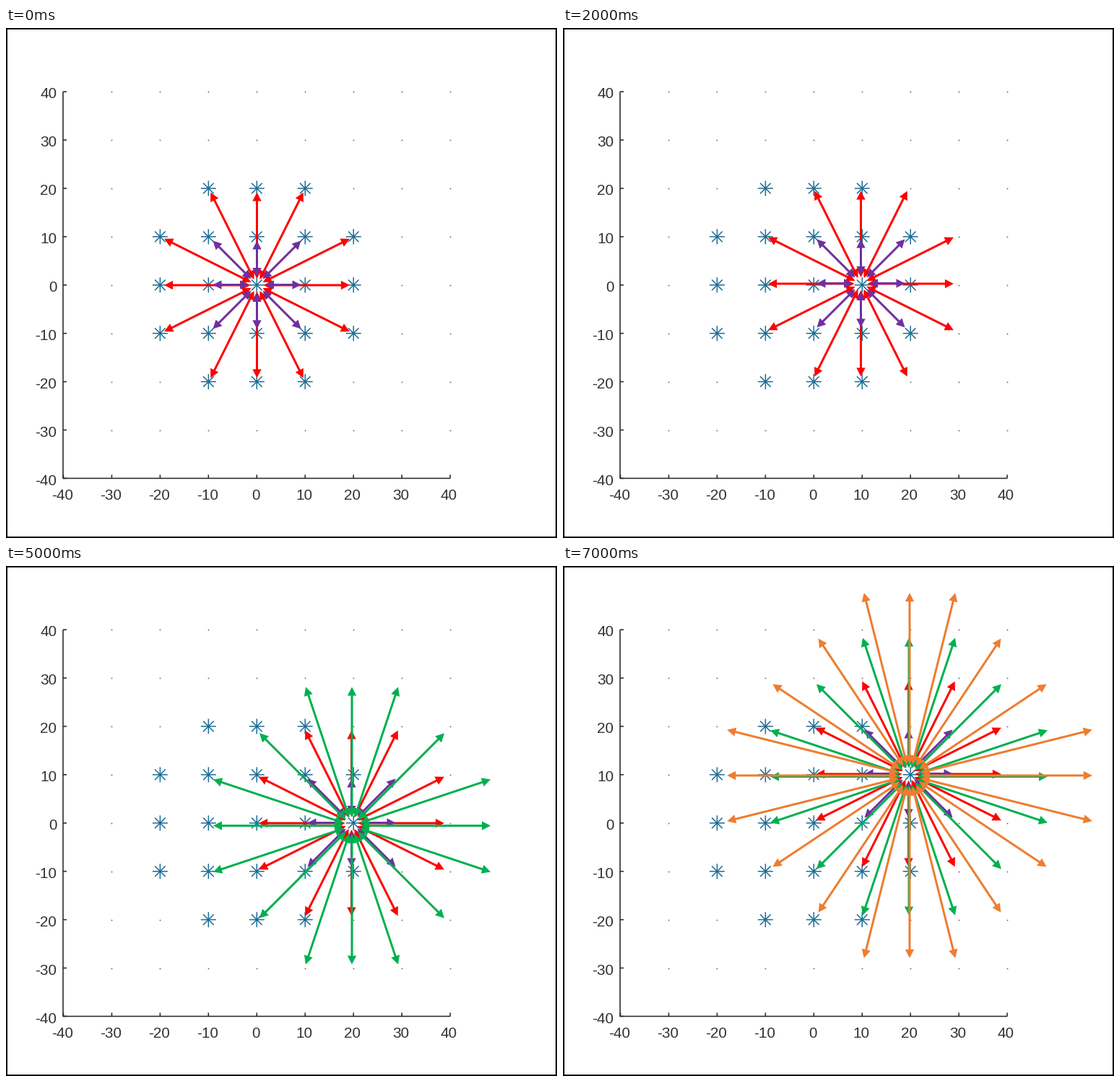
A matplotlib script that plays this animation: 763 px wide and 706 px high, repeating every 8 s.

```python
import itertools

import matplotlib.pyplot as plt
import numpy as np
from matplotlib.animation import FuncAnimation
from matplotlib.patches import Rectangle

W, H, DPI = 763, 706, 100
PX = 72 / DPI  # points per pixel
INK = "#2b2b2b"
STAR = "#1a6b94"

# Ring distance, colour, pixels per grid step, inner gap, centre shift.
# Drawn bottom to top in this order.
RINGS = [
    (2, "#ff0000", 64.2, 9, (0, 0.5)),
    (1, "#7030a0", 61.0, 11.5, (0, 0)),
    (3, "#00b050", 64.0, 12, (0.5, 4)),
    (4, "#ed7d31", 63.2, 16, (1.5, 2.5)),
]

# Hub position and number of visible rings for every second.
HUBS = [(347, 355), (412, 353), (478, 355), (478, 287)]
SCENES = [(0, 2), (1, 2), (1, 2), (1, 3), (2, 3), (2, 3), (2, 4), (3, 4)]


def px(value):
    return 346.8 + value * 6.695


def py(value):
    return 355.3 - value * 6.69


def ring_nodes(distance):
    """Grid steps that lie on a rounded ring around the hub."""
    steps = range(-distance, distance + 1)
    for x, y in itertools.product(steps, steps):
        near, far = sorted((abs(x), abs(y)))
        if far + near * 2 // 3 == distance:
            yield np.array([x, y], float)


def arrow(node, pitch, gap, shift):
    """Shaft and two triangular heads relative to the hub."""
    along = node / np.hypot(*node)
    side = np.array([-along[1], along[0]]) * 6.2
    outer, inner = node * pitch + shift, along * gap + shift
    away = (outer - inner) / np.hypot(*(outer - inner))
    shaft = np.array([outer - away * 9, inner + away * 9])
    heads = []
    for tip, way in ((outer, -away), (inner, away)):
        base = tip + way * 12
        heads.append(np.array([tip, base + side, base - side]))
    return shaft, heads


def draw_plot():
    ticks = range(-40, 41, 10)
    left, right, top, bottom = px(-40) - 0.5, px(40), py(40), py(-40)
    line = dict(color=INK, lw=1.6 * PX, solid_capstyle="butt", snap=False)
    ax.plot([left, left, right], [top, bottom, bottom], **line)
    font = dict(family="Liberation Sans", size=20.8 * PX, color="#333333",
                va="baseline")
    for t in ticks:
        ax.plot([left, left + 5], [py(t)] * 2, **line)
        ax.plot([px(t)] * 2, [bottom, bottom - 5], **line)
        ax.text(69.8, py(t) + 9.2, str(t), ha="right", **font)
        ax.text(px(t) - 1.6, 652.9, str(t), ha="center", **font)

    dots = [(px(x), py(y)) for x in ticks for y in ticks if x > -40 < y]
    ax.plot(*zip(*dots), "s", color="#606060", ms=1.6 * PX, mew=0, snap=False)

    for x, y in itertools.product(range(-20, 21, 10), repeat=2):
        if abs(x) + abs(y) < 40:
            for dx, dy in ((10.5, 0), (0, 10.5), (7.3, 7.3), (7.3, -7.3)):
                ax.plot([px(x) - dx, px(x) + dx], [py(y) - dy, py(y) + dy],
                        color=STAR, lw=1.5 * PX, solid_capstyle="butt",
                        snap=False)


fig = plt.figure(figsize=(W / DPI, H / DPI), dpi=DPI, facecolor="white")
ax = fig.add_axes([0, 0, 1, 1])
ax.set(xlim=(-0.5, W - 0.5), ylim=(H - 0.5, -0.5))
ax.axis("off")
draw_plot()
ax.add_patch(Rectangle((0.5, 0.5), W - 2, H - 2, fill=False, ec="black",
                       lw=2 * PX, joinstyle="miter"))

shafts, heads = [], []  # artist, points around the hub, ring index
for ring, (distance, color, *shape) in enumerate(RINGS):
    for node in ring_nodes(distance):
        shaft, tips = arrow(node, *shape)
        line, = ax.plot([], [], color=color, lw=3 * PX, zorder=5 + ring,
                        solid_capstyle="butt", snap=False)
        shafts.append((line, shaft, ring))
        for tip in tips:
            patch, = ax.fill(*tip.T, color=color, lw=0, zorder=5 + ring)
            heads.append((patch, tip, ring))


def update(i):
    stop, count = SCENES[i]
    hub = np.array(HUBS[stop])
    for line, points, ring in shafts:
        line.set_data(*(points + hub).T)
        line.set_visible(ring < count)
    for patch, points, ring in heads:
        patch.set_xy(points + hub)
        patch.set_visible(ring < count)
    return []


anim = FuncAnimation(fig, update, frames=len(SCENES), interval=1000,
                     init_func=lambda: update(0), repeat=True, repeat_delay=0)
plt.show()
```
